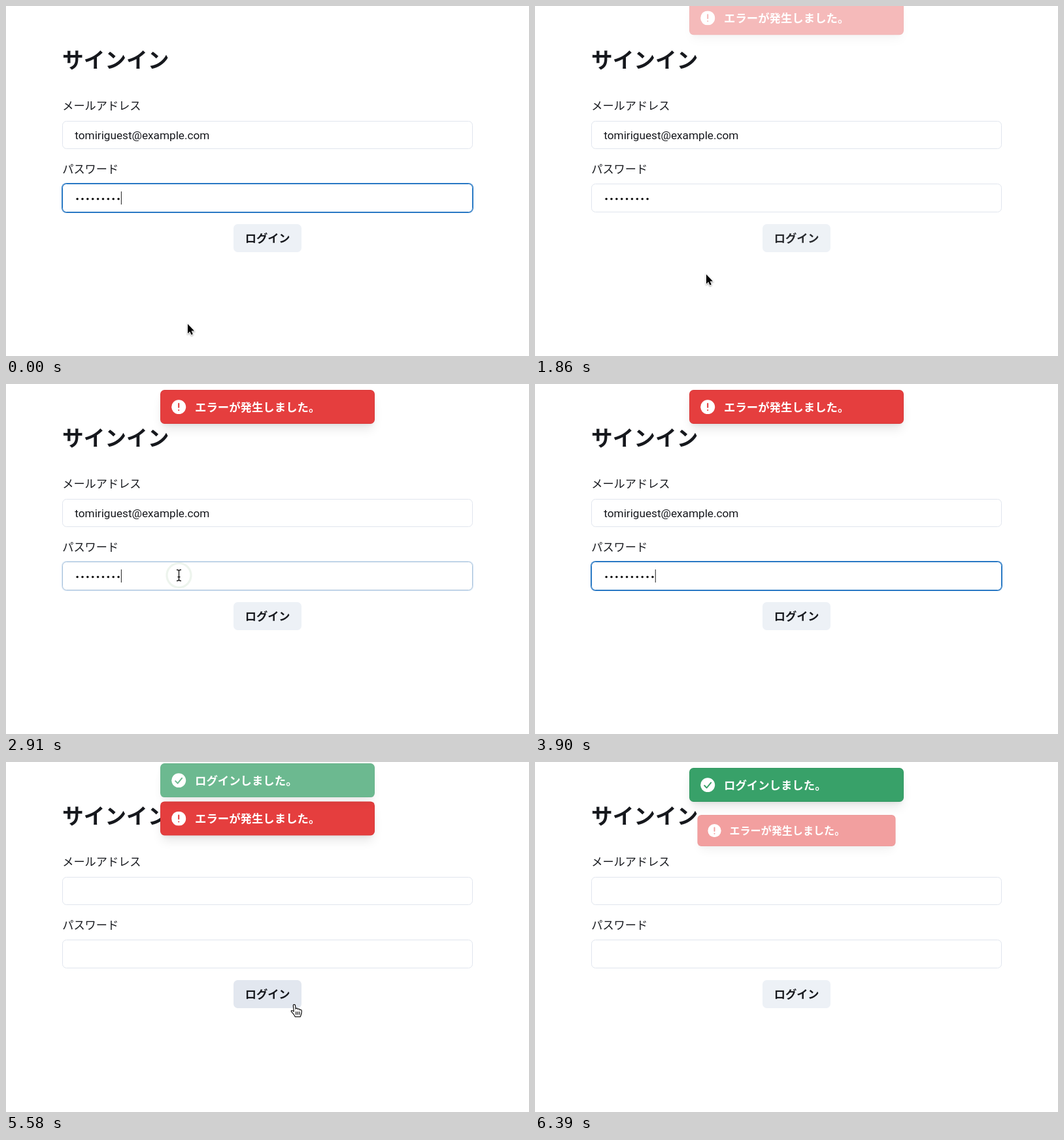
These frames come from a looping animation (800 by 536 pixels, 6.42 s). An HTML page:

```html
<!DOCTYPE html>
<html lang="ja">
<head>
<meta charset="utf-8">
<title>サインイン</title>
<style>
html, body { margin: 0; width: 100%; height: 100%; overflow: hidden; background: #fff; }
body { position: relative; color: #16181d; font: 17.2px/20px "Noto Sans CJK JP", "Noto Sans CJK", sans-serif; white-space: nowrap; }
body > * { position: absolute; box-sizing: border-box; margin: 0; }
h1 { left: 86px; top: 61px; font-size: 32.7px; line-height: 40px; font-weight: 700; }
label { left: 86.2px; }
.field { left: 86.3px; width: 627.8px; height: 43.4px; border: 1px solid #e0e5ee; border-radius: 6.5px; }
#email { top: 176px; padding-left: 18px; font: 17.2px/42.4px Roboto, sans-serif; }
#password { top: 272.3px; }
#button { left: 348.4px; top: 333.5px; width: 103.6px; height: 43.5px; border-radius: 6.5px; }
#caption { line-height: 41.5px; font-weight: 700; text-align: center; }
.toast { left: 236px; top: 9px; width: 328px; height: 52px; border-radius: 6.5px; padding-left: 53px;
  color: #fff; font-weight: 700; font-size: 17.4px; line-height: 51px;
  box-shadow: inset 0 0 0 1px rgba(0,0,0,.06), 0 10.7px 16px -3.2px rgba(0,0,0,.1), 0 4.3px 6.4px -2.1px rgba(0,0,0,.05); }
.toast svg { position: absolute; left: 17.2px; top: 15.1px; fill: none; stroke-linecap: round; stroke-linejoin: round; }
#failure { background: #e53e3e; }
#failure path { stroke: #e53e3e; stroke-width: 2.1; }
#success { background: #38a169; }
#success path { stroke: #38a169; stroke-width: 1.9; }
#overlay { left: 0; top: 0; }
</style>
</head>
<body>
<h1>サインイン</h1>
<label style="top:142px">メールアドレス</label>
<div id="email" class="field"></div>
<label style="top:238.5px">パスワード</label>
<div id="password" class="field"></div>
<div id="button"><div id="caption">ログイン</div></div>

<div id="failure" class="toast">
  <svg width="22.4" height="22.4"><circle cx="11.2" cy="11.2" r="11" fill="#fff"/><path d="M11.2 6v5.8M11.2 16v.1"/></svg>
  エラーが発生しました。
</div>
<div id="success" class="toast">
  <svg width="22.4" height="22.4"><circle cx="11.2" cy="11.2" r="11" fill="#fff"/><path d="M6.2 12l3.4 3.6 6.6-8"/></svg>
  ログインしました。
</div>

<svg id="overlay" width="800" height="536" fill="none">
  <g id="dots" fill="#111"></g>
  <path id="caret" d="M0 284v20" stroke="#333" stroke-width="1.1"/>
  <path id="spinner" d="M-6-6A8.5 8.5 0 0 1 6 6" stroke="#1a202c" stroke-width="2.1"/>
  <circle id="ring" stroke="#9fc39b" stroke-width="3.2"/>
  <g id="pointer">
    <path id="arrow" d="M0 0V14.5L3.3 11.4 5.5 16.6 7.8 15.6 5.6 10.5H10Z" fill="#000" stroke="#fff" stroke-width="1.6"
      paint-order="stroke" style="filter:drop-shadow(0 1px 1px #0006)"/>
    <g id="denied">
      <circle cx="10" cy="22.6" r="8.6" fill="#fff" stroke="#858585" stroke-width="4"/>
      <path d="M4 16.6l12 12" stroke="#858585" stroke-width="4"/>
      <circle cx="10" cy="22.6" r="8.6" stroke="#f4f4f4" stroke-width="2"/>
      <path d="M4 16.6l12 12" stroke="#f4f4f4" stroke-width="2"/>
    </g>
    <g id="hand" stroke="#111" stroke-width="1.2" stroke-linejoin="round" stroke-linecap="round">
      <path fill="#fff" d="M-2 1.2C-2-.8 1-.8 1.2 1.2L1.8 6.5C2.5 5 5 5.2 5 7 6 5.8 8 6.2 8 8 9.5 7 11 8 11 9.5 11 14 10 15 9 18.5H1C0 15.5-3 13-4.8 10.5-5.8 8.5-3.5 8-1 10.5Z"/>
      <path d="M2.3 11v4M4.9 11v4M7.5 11v4"/>
    </g>
    <path id="beam" d="M-3.5-8.5Q0-8.5 0-6.5Q0-8.5 3.5-8.5M0-6.5V6.5M-3.5 8.5Q0 8.5 0 6.5Q0 8.5 3.5 8.5M-2 2.5H2" stroke="#111" stroke-width="1.3"/>
  </g>
</svg>

<script>
const LOOP = 6420, BLUE = '#2878c4';
const CLICKS = [910, 2880, 4560];
const LOADING = [[990, 1743], [4639, 5393]];
const FAILURE_IN = 1743, SUCCESS_IN = 5393, FAILURE_OUT = 6260;
const TYPED = 3500, POINTER_BACK = 4020;
const PATH = [
  [510, 278, 487], [880, 415, 362], [1200, 415, 362], [1800, 262, 411], [1920, 262, 411],
  [2600, 264.5, 293], [POINTER_BACK, 264.5, 293], [4480, 441.3, 371.7], [5760, 441.3, 371.7], [6250, 405, 556]
];

const $ = id => document.getElementById(id);
const clamp = v => Math.min(1, Math.max(0, v));
const smooth = v => v * v * (3 - 2 * v);
const within = (t, [from, to]) => t >= from && t < to;
const show = (id, on) => $(id).style.display = on ? '' : 'none';
const mix = (a, b, p) => `color-mix(in srgb, ${b} ${p * 100}%, ${a})`;

// Cubic Bezier easing, solved by bisection
function bezier(x1, y1, x2, y2) {
  const at = (a, b, s) => 3 * a * s * (1 - s) ** 2 + 3 * b * s * s * (1 - s) + s ** 3;
  return x => {
    if (x <= 0 || x >= 1) return clamp(x);
    let low = 0, high = 1;
    for (let i = 0; i < 24; i++) {
      const mid = (low + high) / 2;
      if (at(x1, x2, mid) < x) low = mid; else high = mid;
    }
    return at(y1, y2, low);
  };
}
const enter = bezier(.4, 0, .2, 1), leave = bezier(.4, 0, 1, 1), ease = bezier(.25, .1, .25, 1);
const fade = (t, from, to) => ease(clamp((t - from) / 200)) - ease(clamp((t - to) / 200));

function pointerAt(t) {
  const next = PATH.findIndex(p => p[0] > t);
  if (next === 0) return PATH[0].slice(1);
  if (next < 0) return PATH[PATH.length - 1].slice(1);
  const [t0, x0, y0] = PATH[next - 1], [t1, x1, y1] = PATH[next];
  const p = smooth((t - t0) / (t1 - t0));
  return [x0 + (x1 - x0) * p, y0 + (y1 - y0) * p];
}

function drawForm(t) {
  const loading = LOADING.find(span => within(t, span));
  const filled = t < SUCCESS_IN;
  $('email').textContent = filled ? 'tomiriguest@example.com' : '';

  const focus = fade(t, -500, CLICKS[0]) + fade(t, CLICKS[1], CLICKS[2]);
  const idle = mix('#e0e5ee', '#cbd5e0', fade(t, 2400, TYPED));
  $('password').style.borderColor = mix(idle, BLUE, focus);
  $('password').style.boxShadow = `0 0 0 1px ${mix('transparent', BLUE, focus)}`;

  const count = t < TYPED ? 9 : 10;
  show('dots', filled);
  [...$('dots').children].forEach((dot, i) => dot.style.display = i < count ? '' : 'none');
  const caretOn = [[0, 360], [860, CLICKS[0]], [CLICKS[1], 3370], [TYPED, 4000], [4500, CLICKS[2]]];
  show('caret', caretOn.some(span => within(t, span)));
  $('caret').setAttribute('transform', `translate(${105.6 + count * 7.87})`);

  const hover = fade(t, 780, 990) + fade(t, 4370, 4639) + fade(t, SUCCESS_IN, 5840);
  const dim = LOADING.reduce((sum, span) => sum + fade(t, ...span), 0);
  $('button').style.background = mix('#edf1f6', '#e2e7ef', hover);
  $('button').style.opacity = 1 - .6 * dim;
  show('caption', !loading);
  show('spinner', loading);
  if (loading) {
    $('spinner').setAttribute('transform', `translate(400 355.3) rotate(${(t - loading[0]) * .8})`);
    $('spinner').style.opacity = 1 - .6 * dim;
  }
  return loading;
}

function drawToasts(t) {
  const failure = enter((t - FAILURE_IN) / 400);
  const success = enter((t - SUCCESS_IN) / 400);
  const gone = leave((t - FAILURE_OUT) / 200);
  $('failure').style.opacity = failure * (1 - gone);
  $('failure').style.transform = `translateY(${26 * (failure - 1) + 70 * success}px) scale(${1 - .15 * gone})`;
  $('success').style.opacity = success;
  $('success').style.transform = `translateY(${26 * (success - 1)}px)`;
}

function drawPointer(t, loading) {
  const [x, y] = pointerAt(t);
  const onButton = x > 348 && x < 452 && y > 333 && y < 377;
  const onField = x > 86 && x < 714 && (y > 176 && y < 219 || y > 272 && y < 316);
  show('pointer', !within(t, [TYPED, POINTER_BACK]));
  $('pointer').setAttribute('transform', `translate(${x} ${y})`);
  show('hand', onButton && !loading);
  show('denied', onButton && loading);
  show('beam', onField);
  show('arrow', !onField && (!onButton || loading));

  const click = CLICKS.find(c => within(t, [c, c + 420]));
  show('ring', click);
  if (!click) return;
  const age = t - click, spread = clamp((age - 120) / 300);
  const ring = $('ring');
  ring.setAttribute('cx', x);
  ring.setAttribute('cy', y);
  ring.setAttribute('r', 18.5 + 21.5 * (1 - (1 - spread) ** 2));
  ring.style.opacity = .6 * clamp(age / 100) * (1 - spread) ** 2.5;
}

for (let i = 0; i < 10; i++) {
  $('dots').insertAdjacentHTML('beforeend', `<circle cx="${109.1 + 7.87 * i}" cy="295.4" r="1.75"/>`);
}

const start = performance.now();
function frame() {
  const t = (performance.now() - start) % LOOP;
  const loading = drawForm(t);
  drawToasts(t);
  drawPointer(t, loading);
  requestAnimationFrame(frame);
}
frame();
</script>
</body>
</html>
```
